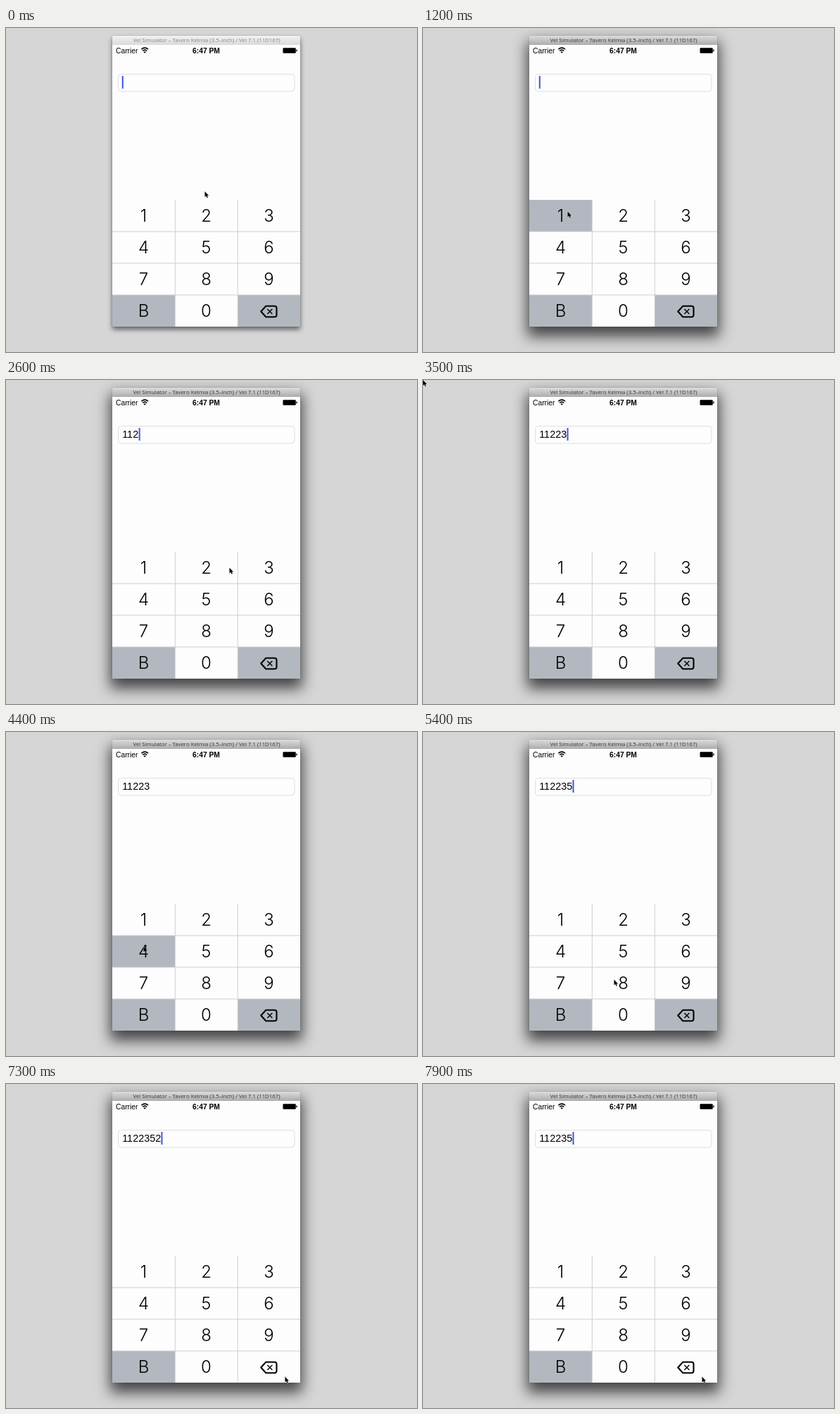
Recreate the animation shown at these times as an HTML page. Size 584 by 460 pixels, loop 8 s.

```html
<!DOCTYPE html>
<html lang="en">
<head>
<meta charset="utf-8">
<style>
html, body { margin: 0; width: 100%; height: 100%; overflow: hidden; background: #d6d6d6; }
svg { position: absolute; left: 0; top: 0; font-kerning: none; }
#win {
  position: absolute; left: 151px; top: 11px; width: 267px; height: 413px;
  border-radius: 3px 3px 0 0; background: #fdfdfd;
  box-shadow: 0 0 1px rgba(0,0,0,.5), 0 4px 7px rgba(0,0,0,.55);
}
#bar {
  height: 12.5px; border-radius: 3px 3px 0 0;
  background: linear-gradient(#f2f2f2, #dadada);
}
.active #win { box-shadow: 0 0 1px rgba(0,0,0,.5), 0 11px 20px 3px rgba(0,0,0,.68); }
.active #bar { background: linear-gradient(#dcdcdc, #acacac); }
#title { font: 7.8px "Open Sans", "Noto Sans", sans-serif; fill: #858585; text-anchor: middle; }
.active #title { fill: #333; }
.ui { font: 10.3px "Liberation Sans", Arial, sans-serif; }
#entry { font: 14.4px "Liberation Sans", Arial, sans-serif; }
#keys text { font: 300 24px Inter, Roboto, sans-serif; text-anchor: middle; }
</style>
</head>
<body>
<div id="win"><div id="bar"></div></div>
<svg width="584" height="460" viewBox="0 0 584 460">
  <text id="title" x="285" y="20">Vel Simulator – Tavero Kelmia (3.5–inch) / Vel 7.1 (11D167)</text>

  <g class="ui">
    <text x="156" y="36">Carrier</text>
    <text x="284.5" y="36" text-anchor="middle" font-weight="bold">6:47 PM</text>
  </g>
  <path d="M192.3 30.3q4.9-4.4 9.8 0M194.1 32.5q3.1-2.7 6.2 0" fill="none" stroke="#000" stroke-width="1.5"/>
  <path d="M195.5 33.9q1.7-1.3 3.4 0l-1.7 1.8z"/>
  <rect x="393.5" y="28.3" width="18.3" height="7.4" rx="1.2"/>
  <rect x="412.4" y="30.6" width="1.3" height="2.8" rx=".6"/>

  <rect x="159.5" y="65.5" width="250.5" height="24.5" rx="4" fill="#fdfdfd" stroke="#dedede"/>
  <text id="entry" x="165.2" y="82"></text>
  <rect id="caret" y="68" width="2" height="18" fill="#4055e0"/>

  <g id="keys"></g>
  <path d="M240.3 244V424M329.3 244V424M151 289H418M151 334H418M151 379H418" stroke="#cfcfcf"/>
  <g fill="none" stroke="#000" stroke-linejoin="round">
    <path d="M362.3 402.5l7-7.8h12.2q3 0 3 3v9.6q0 3-3 3h-12.2z" stroke-width="2.1"/>
    <path d="M371.4 399l7 7m0-7l-7 7" stroke-width="1.4"/>
  </g>
  <path id="pointer" d="M0 0V8L1.8 6.3L3.1 9.2L4.4 8.6L3.2 5.9H5.6Z" stroke="#fff" stroke-width=".7" paint-order="stroke"/>
</svg>
<script>
const $ = id => document.getElementById(id);
const LOOP = 8000, STEP = 100, FOCUS = 1000;
const KEYS = '123456789B0<', KEY_W = 89, KEY_H = 45;
const LIGHT = '#fdfdfd', DARK = '#b3b7bf';

// Each press slides over its keys; dx, dy is where it lands relative to the first key's centre
const press = (keys, down, up, dx, dy) => ({ keys, down, up, dx, dy });
const PRESSES = [
  press('1', 1200, 1400, 10, -6),
  press('1', 1600, 1900, 10, -6),
  press('2', 2300, 2600, 33, 0),
  press('2', 2800, 3000, 33, 0),
  press('3', 3300, 3500, 0, -6),
  press('32145', 3600, 5300, 0, -6),
  press('852', 5500, 6300, -13, -5),
  press('<', 7300, 7500, 23, 14),
  press('<', 7900, LOOP, 23, 14)
];

const clamp = k => Math.min(1, Math.max(0, k));
const easeOut = (k, power) => 1 - (1 - clamp(k)) ** power;
const mix = (a, b, k) => a.map((v, i) => v + (b[i] - v) * k);

function centre(key) {
  const i = KEYS.indexOf(key);
  return [195.5 + i % 3 * KEY_W, 266.5 + Math.floor(i / 3) * KEY_H];
}

const slide = (p, t) => easeOut((t - p.down) / (p.up - p.down), 2);

function keyUnder(p, t) {
  return p.keys[Math.round(slide(p, t) * (p.keys.length - 1))];
}

// A long slide drifts towards the key centres
function pressPoint(p, t) {
  const last = p.keys.length - 1, k = slide(p, t), pos = k * last, i = Math.floor(pos);
  const [x, y] = mix(centre(p.keys[i]), centre(p.keys[Math.min(i + 1, last)]), pos - i);
  const drift = last ? 1 - k : 1;
  return [x + p.dx * drift, y + p.dy * drift];
}

function pointerAt(t) {
  const i = PRESSES.findIndex(p => t < p.up), next = PRESSES[i], prev = PRESSES[i - 1];
  if (t >= next.down) return pressPoint(next, t);
  const from = prev ? pressPoint(prev, prev.up) : [282.5, 232];
  const left = prev ? prev.up : 0;
  const time = Math.min(next.down - left - STEP, 800);
  return mix(from, pressPoint(next, next.down), easeOut((t - left) / time, prev ? 4 : 2));
}

const cells = [...KEYS].map((key, i) => {
  const [x, y] = centre(key);
  $('keys').insertAdjacentHTML('beforeend',
    `<rect x="${151 + i % 3 * KEY_W}" y="${y - 22.5}" width="${KEY_W}" height="${KEY_H}"/>
    <text x="${x}" y="${y + 8.5}">${key === '<' ? '' : key}</text>`);
  return $('keys').lastElementChild.previousElementSibling;
});

function draw(t) {
  let text = '', held = '', blink = -200;
  for (const p of PRESSES) {
    if (t >= p.up) {
      const key = p.keys.at(-1);
      text = key === '<' ? text.slice(0, -1) : text + key;
      blink = p.up;
    } else if (t >= p.down) held = keyUnder(p, t);
  }
  document.body.className = t >= FOCUS ? 'active' : '';
  $('entry').textContent = text;
  $('caret').setAttribute('x', 164.8 + text.length * 7.95);
  $('caret').setAttribute('opacity', (t - blink) % 1000 < 500 ? 1 : 0);
  cells.forEach((cell, i) => {
    const dark = 'B<'.includes(KEYS[i]) !== (KEYS[i] === held);
    cell.setAttribute('fill', dark ? DARK : LIGHT);
  });
  $('pointer').setAttribute('transform', `translate(${pointerAt(t)})`);
}

const start = performance.now();
function tick() {
  const t = (performance.now() - start) % LOOP;
  draw(Math.floor(t / STEP) * STEP);
  requestAnimationFrame(tick);
}
tick();
</script>
</body>
</html>
```
